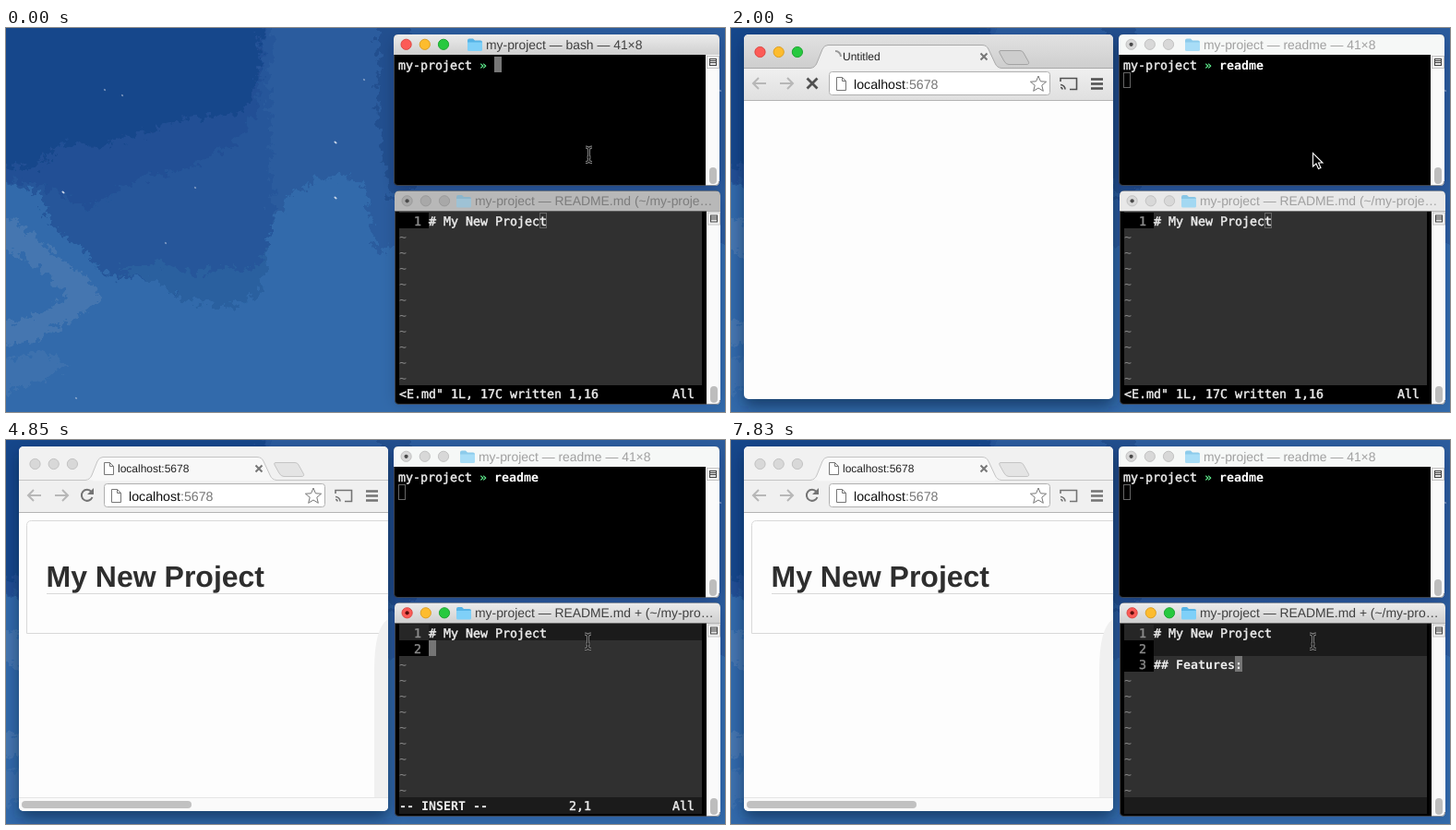
An HTML page for the animation above (8 s loop, 779 by 416 pixels).

```html
<!DOCTYPE html>
<html lang="en">
<head>
<meta charset="utf-8">
<title>Live readme preview</title>
<style>
html, body { margin: 0; width: 100%; height: 100%; overflow: hidden; background: #2b5c9e; }
svg { display: block; width: 779px; height: 416px; }
text { white-space: pre; text-rendering: geometricPrecision; }
.ui { font-family: "Liberation Sans", Arial, sans-serif; }
.mono { font: 13.29px "DejaVu Sans Mono", monospace; fill: #ececec; stroke: #ececec; stroke-width: .45; }
.mono .b, .mono.b { font-weight: bold; stroke: none; }
.mono .n { fill: #8a8a8a; stroke: #8a8a8a; }
.mono.tilde { fill: #858585; stroke: none; }
.title { font-size: 13.9px; fill: #404040; }
.bar { fill: url(#bar); }
.red { fill: #fc5b57; stroke: #dd4641; }
.yel { fill: #fdbc2e; stroke: #dd9f22; }
.grn { fill: #27c93f; stroke: #1ea632; }
.dot { fill: #5d0d0a; }
.off .title { fill: #a0a0a0; }
.off .bar { fill: #f6f8f7; }
.off .light { fill: #d8d8d8; stroke: #c2c2c2; }
.off .dot { fill: #4a4a4a; }
.off .folder { opacity: .65; }
#term:not(.off) .dot { display: none; }
#vim.off .bar { fill: #e8e8e8; }
#vim.dim .bar { fill: #b8b8b8; }
#vim.dim .title { fill: #7c7c7c; }
#vim.dim .light { fill: #a8a8a8; stroke: #9a9a9a; }
#vim.dim .folder { opacity: .45; }
.strip { fill: url(#strip); }
.tools { fill: url(#tools); }
.tab { fill: #f0f0f0; stroke: #a9a9a9; }
.plus { fill: #cdcdcd; stroke: #a3a3a3; }
.off .strip { fill: #f1f1f1; }
.off .tools { fill: #f0f0f0; }
.off .tab { fill: #f8f8f8; stroke: #c4c4c4; }
.off .plus { fill: #e4e4e4; stroke: #c4c4c4; }
.line { fill: none; stroke-width: 2; }
</style>
</head>
<body>
<svg viewBox="0 0 779 416">
<defs>
  <linearGradient id="bar" x2="0" y2="1"><stop stop-color="#ececec"/><stop offset="1" stop-color="#cfcfcf"/></linearGradient>
  <linearGradient id="strip" x2="0" y2="1"><stop stop-color="#e2e2e2"/><stop offset="1" stop-color="#cecece"/></linearGradient>
  <linearGradient id="tools" x2="0" y2="1"><stop stop-color="#f0f0f0"/><stop offset="1" stop-color="#dfdfdf"/></linearGradient>
  <filter id="grain" x="-5%" y="-5%" width="110%" height="110%">
    <feTurbulence type="fractalNoise" baseFrequency=".12" numOctaves="5" seed="4"/>
    <feDisplacementMap in="SourceGraphic" scale="24" xChannelSelector="R" yChannelSelector="G"/>
  </filter>
  <filter id="blur" x="-20%" y="-20%" width="140%" height="140%"><feGaussianBlur stdDeviation="8"/></filter>
  <clipPath id="page"><rect x="14" y="7" width="400" height="395" rx="5"/></clipPath>
</defs>

<rect width="779" height="416" fill="#2b5c9e"/>
<g filter="url(#grain)">
  <path fill="#25569a" d="M-20-20H290L285 90 290 225 270 300H160L60 250-20 170Z"/>
  <path fill="#205095" d="M-20-20H280L274 80 255 118 205 150 140 165 90 195 50 175-20 160Z"/>
  <path fill="#19478b" d="M-20-20H278L272 60 258 92 200 97 150 112 105 128 60 125 30 152-20 145Z"/>
  <path fill="#306bab" d="M-20 160L38 180 45 207 80 240 115 270 165 273 185 292 240 302 270 290 282 250 288 214 308 182 340 163 375 159 390 180 400 240 425 235H820V440H-20Z"/>
  <path fill="#2b609f" d="M120 262L165 254 200 266 245 258 272 262 282 235 284 258 270 292 240 303 190 293 165 275Z"/>
  <path fill="#4576b0" d="M-20 190L22 215 60 250 98 280 104 296 65 318 30 340-20 345V328L40 308 68 290 38 264 0 238-20 232Z"/>
  <path fill="#3d71ae" d="M-20 365L40 350 70 365 45 380-20 400Z"/>
  <path fill="#24508f" d="M404-20H440V185H416Q398 110 404-20Z"/>
</g>
<g id="stars" fill="#d3dcec"></g>

<g fill="#04122e" filter="url(#blur)">
  <rect x="422" y="14" width="349" height="158" opacity=".3"/>
  <rect x="423" y="184" width="349" height="222" opacity=".22"/>
</g>
<g id="browser"></g>
<g id="term"></g>
<g id="vim"></g>
<g id="mouse"></g>
</svg>

<script>
const $ = id => document.getElementById(id);
const rect = (x, y, w, h, fill, extra = '') =>
  `<rect x="${x}" y="${y}" width="${w}" height="${h}" fill="${fill}" ${extra}/>`;
const esc = s => s.replace(/</g, '&lt;');
const mono = (x, y, s, cls = '') => `<text class="mono ${cls}" x="${x}" y="${y}">${esc(s)}</text>`;
const label = (x, y, s, size, fill, extra = '') =>
  `<text class="ui" x="${x}" y="${y}" font-size="${size}" fill="${fill}" ${extra}>${s}</text>`;
const lights = (x, y) => ['red', 'yel', 'grn'].map((c, i) =>
  `<circle class="light ${c}" cx="${x + i * 20.2}" cy="${y}" r="5.6"/>`).join('');
const hollow = (x, y) => rect(x + .5, y + .5, 7, 16, 'none', 'stroke="#666"');

const folder = (x, y) => `<g class="folder" transform="translate(${x} ${y})">
  <path fill="#56b4e6" d="M0 2Q0 0 2 0H6L8 2H14Q16 2 16 4V12H0Z"/>
  <path fill="#7fd0f8" d="M0 4H16V12Q16 13.5 14.5 13.5H1.5Q0 13.5 0 12Z"/></g>`;

// Terminal frame: title bar, black body, scroll strip
function frame(x, y, h, folderX, title) {
  const bottom = y + h;
  return rect(x, y, 353, h, '#000', 'rx="5"') +
    `<path class="bar" d="M${x} ${y + 22}V${y + 5}q0-5 5-5h343q5 0 5 5v17Z"/>` +
    lights(x + 13.6, y + 10.8) +
    `<circle class="dot" cx="${x + 13.6}" cy="${y + 10.8}" r="2.1"/>` +
    folder(folderX, y + 4.5) +
    `<text class="ui title" x="${folderX + 20}" y="${y + 15.8}">${title}</text>` +
    `<path fill="#fafafa" d="M${x + 338} ${y + 22}h15v${h - 27}q0 5-5 5h-10Z"/>` +
    `<path fill="none" stroke="#56606e" stroke-opacity=".7" d="M${x + .5} ${y + 22}V${bottom - 5}q0 4.500 4.500 4.500h343q4.500 0 4.500-4.500"/>` +
    rect(x + 339.5, y + 23.5, 13, 13, '#f2f2f2', 'stroke="#c4c4c4"') +
    rect(x + 342.5, y + 26.5, 7, 7, '#e4e4e4', 'stroke="#444"') +
    `<path stroke="#444" d="M${x + 342} ${y + 28.5}h8m-8 2h8"/>` +
    rect(x + 342, bottom - 20, 8, 18, '#bdbdbd', 'rx="4"');
}

const sheet = (x, y, w, h) => `<path fill="#fff" stroke="#777" d="M${x} ${y}h${w - 4}l4 4v${h - 4}h${-w}Zm${w - 4} 0v4h4"/>`;

function drawBrowser(s) {
  const ink = s.focus === 'browser' ? '#505050' : '#747474';
  const arrow = 'M-7 0H7M-1-6L-7 0-1 6';
  const star = Array.from({ length: 10 }, (_, i) => {
    const r = i % 2 ? 4 : 9, a = i * Math.PI / 5;
    return `${(333 + r * Math.sin(a)).toFixed(1)},${(61 - r * Math.cos(a)).toFixed(1)}`;
  }).join(' ');
  const page = s.loaded
    ? `<path fill="none" stroke="#d9d9d9" d="M414 209.500H22.500V92.500q0-5 5-5H414M44 166.500H414"/>` +
      label(43.500, 159, 'My New Project', 32, '#2e2e2e', 'font-weight="bold"') +
      (s.focus === 'vim' ? '<path fill="#f0f0f0" d="M414 194Q399 203 399 250V387H414Z"/>' : '') +
      rect(14, 387, 400, 15, '#fafafa') + rect(14, 387, 400, 1, '#e6e6e6') +
      rect(17, 391, 184, 8, '#c1c1c1', 'rx="4"')
    : '';
  const b = $('browser');
  b.innerHTML =
    rect(14, 15, 400, 395, '#04122e', 'rx="5" opacity=".5" filter="url(#blur)"') +
    '<g clip-path="url(#page)">' + rect(14, 7, 400, 395, '#fdfdfd') +
    '<rect class="strip" x="14" y="7" width="400" height="36"/>' +
    '<rect class="tools" x="14" y="43" width="400" height="36"/>' +
    '<path class="tab" d="M14 43.500H86Q91 43 93 38L99 23Q101 18.500 105 18.500H272Q277 18.500 279 23L286 38Q288 43 293 43.500H414"/>' +
    rect(94, 43, 192, 1.500, s.focus === 'browser' ? '#f0f0f0' : '#f8f8f8') +
    '<path class="plus" d="M292 24.500H313Q316 24.500 317 27L322 36Q324 39.500 320 39.500H301Q298 39.500 296 36L291 27Q290 24.500 292 24.500Z"/>' +
    lights(31.500, 26) +
    (s.loading
      ? '<path class="line" stroke="#999" d="M113 25A6 6 0 0 1 119 31"/>'
      : sheet(106.500, 24.500, 10, 13)) +
    label(121, 35, s.loading ? 'Untitled' : 'localhost:5678', 12, '#222') +
    '<path class="line" stroke="#777" d="M270.500 27.500l7 7m0-7l-7 7"/>' +
    rect(14, 78, 400, 1, '#b4b4b4') +
    `<path class="line" stroke="#b7b7b7" transform="translate(31 60)" d="${arrow}"/>` +
    `<path class="line" stroke="#b7b7b7" transform="translate(60 60) scale(-1 1)" d="${arrow}"/>` +
    (s.loading
      ? `<path class="line" stroke="${ink}" style="stroke-width:2.800" d="M82.500 54.500l11 11m0-11l-11 11"/>`
      : `<path class="line" stroke="${ink}" d="M92.500 56A6 6 0 1 0 93.500 62"/><path fill="${ink}" d="M95 52v7h-7Z"/>`) +
    rect(106.500, 47.500, 239, 25, '#fff', 'rx="3" stroke="#b0b0b0"') +
    sheet(114.500, 53.500, 10, 14) +
    label(133, 66, 'localhost<tspan fill="#777">:5678</tspan>', 14.200, '#111') +
    `<polygon points="${star}" fill="#fff" stroke="#777" stroke-linejoin="round"/>` +
    `<path class="line" stroke="${ink}" style="stroke-width:1.600" d="M357 58V54.500H374.500V66.500H367M357 61.500a5 5 0 0 1 5 5M357 64.500a2 2 0 0 1 2 2"/>` +
    `<path class="line" stroke="${ink}" style="stroke-width:2.600" d="M390 55.500h13m-13 5h13m-13 5h13"/>` +
    page + '</g>';
  b.style.display = s.zoom ? '' : 'none';
  b.setAttribute('opacity', s.zoom < .5 ? .34 : 1);
  b.setAttribute('transform', `translate(214 205) scale(${s.zoom}) translate(-214 -205)`);
  b.setAttribute('class', s.focus === 'browser' ? '' : 'off');
}

function drawTerm(s) {
  const active = s.focus === 'term';
  const x = s.sent ? 425 : 529 + 8 * s.cmd.length, y = s.sent ? 48 : 31;
  $('term').innerHTML =
    frame(420, 7, 164, active ? 500 : 492, `my-project — ${active ? 'bash' : 'readme'} — 41×8`) +
    `<text class="mono" x="425" y="45">my-project <tspan class="b" fill="#5ff08f">»</tspan> <tspan class="b" fill="#fff">${s.cmd}</tspan></text>` +
    (active ? rect(x, y, 8, 17, '#777') : hollow(x, y));
  $('term').setAttribute('class', active ? '' : 'off');
}

function drawVim(s) {
  const active = s.focus === 'vim', rows = s.rows, last = rows - 1;
  const top = r => 200 + 17 * r, base = r => 214 + 17 * r;
  const dark = '#1b1b1b';
  const lines = ['# My New Project', '', s.line || ''];
  const cx = 458 + 8 * s.col;
  let out = frame(421, 176.5, 231.5, 488, 'my-project — README.md ' + (rows > 1 ? '+ (~/my-pro…' : '(~/my-proje…')) +
    rect(426, 199, 328, 188, '#303030');
  if (rows > 1) out += rect(426, 199, 328, 17 * last + 1, dark) + rect(426, 387, 328, 18, dark);
  for (let r = 0; r < rows; r++) {
    out += rect(426, top(r), 32, 17, r === 0 && rows > 1 ? '#262626' : '#000');
    if (r === last) out += active ? rect(cx, top(r), 8, 17, '#757575') : hollow(cx, top(r));
    out += `<text class="mono" x="442" y="${base(r)}"><tspan class="n">${r + 1}</tspan></text>` +
      mono(458, base(r), lines[r], r === 2 ? 'b' : '');
  }
  for (let r = rows; r < 11; r++) out += mono(426, base(r), '~', 'tilde');
  if (s.pos) out += mono(426, 401, s.msg, s.msg[0] === '-' ? 'b' : '') + mono(610, 401, s.pos) + mono(722, 401, 'All');
  $('vim').innerHTML = out;
  $('vim').setAttribute('class', active ? '' : s.focus === 'term' ? 'off dim' : 'off');
}

function drawMouse({ mouse: [x, y, beam] }) {
  const bar = 'M-3.500-8Q0-8 0-5V6Q0 8.500-3.500 8.500M3.500-8Q0-8 0-5M0 6Q0 8.500 3.500 8.500M-2 3H2';
  $('mouse').innerHTML = `<g transform="translate(${x} ${y})">` + (beam
    ? `<path fill="none" stroke="#8c8c8c" stroke-width="3" d="${bar}"/><path fill="none" stroke="#111" stroke-width="1.200" d="${bar}"/>`
    : '<path fill="#000" stroke="#fff" stroke-width="1.100" d="M.5.5V15L4 12 6.500 17.500 9 16.500 6.500 11H11Z"/>') + '</g>';
}

// Each step changes part of the state from its time on
const typed = (time, line) => [time, { line, col: line.length, pos: '3,' + (line.length + 1) }];
const steps = [
  [0, { focus: 'term', cmd: '', sent: false, zoom: 0, loading: true, loaded: false, rows: 1, col: 15,
        msg: '<E.md" 1L, 17C written', pos: '1,16', mouse: [631.5, 137, true] }],
  [500, { cmd: 'r' }], [650, { cmd: 'rea' }], [800, { cmd: 'read' }], [950, { cmd: 'readme' }],
  [1700, { sent: true, zoom: .16 }],
  [1850, { focus: 'browser', zoom: .91, mouse: [630, 135] }],
  [2000, { zoom: 1 }],
  [2150, { loading: false, loaded: true }],
  [3350, { mouse: [628, 166] }],
  [3500, { mouse: [629, 187] }],
  [3650, { mouse: [630.5, 218, true] }],
  [3800, { focus: 'vim' }],
  [4850, { rows: 2, col: 0, msg: '-- INSERT --', pos: '2,1' }],
  [4990, { rows: 3, pos: '3,1' }],
  typed(5590, '#'), typed(5740, '##'), typed(6040, '## '),
  typed(6340, '## F'), typed(6490, '## Fe'), typed(6640, '## Feat'), typed(6790, '## Featu'),
  typed(6930, '## Feature'), typed(7230, '## Features'), typed(7530, '## Features:'),
  [7830, { col: 11, pos: '' }]
];

const stars = [[357, 124], [357, 184], [62, 178], [126, 73], [76, 401], [205, 173], [388, 56], [107, 67], [173, 233], [774, 68]];
$('stars').innerHTML = stars.map(([x, y], i) =>
  `<ellipse cx="${x}" cy="${y}" rx="${i < 3 ? 1.8 : 1.2}" ry="1" opacity="${i < 3 ? .95 : .5}" transform="rotate(35 ${x} ${y})"/>`).join('');

let shown = -1;
const start = performance.now();
function tick() {
  const t = (performance.now() - start) % 8000;
  const n = steps.filter(([time]) => time <= t).length;
  if (n !== shown) {
    shown = n;
    const state = Object.assign({}, ...steps.slice(0, n).map(([, change]) => change));
    for (const draw of [drawBrowser, drawTerm, drawVim, drawMouse]) draw(state);
  }
  requestAnimationFrame(tick);
}
tick();
</script>
</body>
</html>
```
